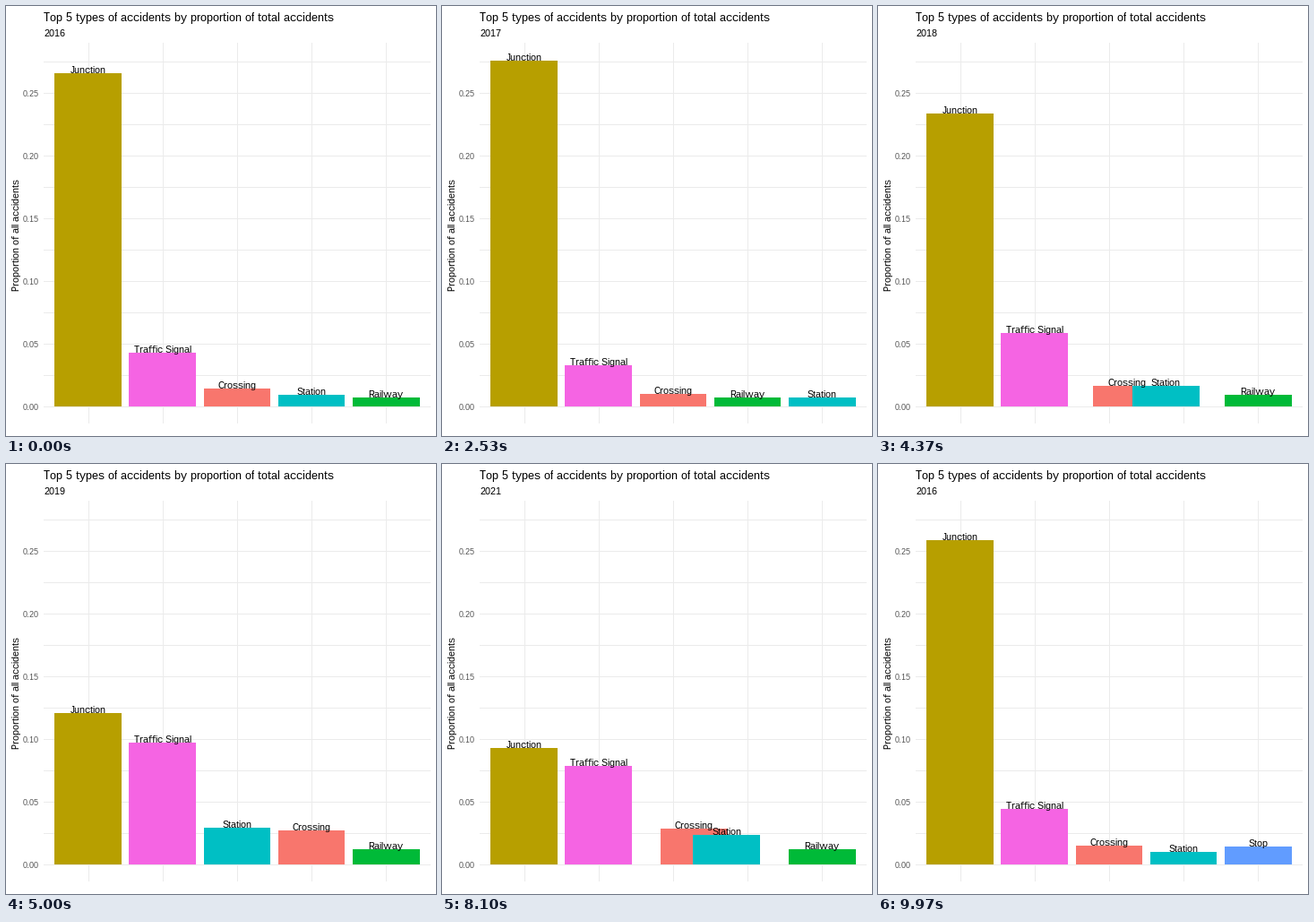
A matplotlib script for the animation above (10 s loop, 480 by 480 pixels).

```python
import matplotlib.pyplot as plt
from matplotlib.animation import FuncAnimation
from matplotlib.patches import Rectangle

plt.rcParams.update({
    "font.family": "Liberation Sans",
    "text.hinting": "native",
    "text.hinting_factor": 1,
    "text.kerning_factor": 6,
})

SIZE, DPI = 480, 72
FRAMES, LOOP_MS = 300, 10000
STEP = 50            # frames per year
HOLD = 25            # frames at rest before the bars move
BASE = 447           # pixel row of zero
FIRST_LEFT, SLOT, BAR_W = 54.35, 83.08, 74.85

COLORS = {
    "Crossing": "#F8766D",
    "Junction": "#B79F00",
    "Railway": "#00BA38",
    "Station": "#00BFC4",
    "Stop": "#619CFF",
    "Traffic Signal": "#F564E3",
}

# Bar tops in pixels, listed in rank order for each year
YEARS = [
    (2016, {"Junction": 75, "Traffic Signal": 387, "Crossing": 427,
            "Station": 434, "Railway": 437}),
    (2017, {"Junction": 60.6, "Traffic Signal": 400.7, "Crossing": 433.2,
            "Railway": 437.1, "Station": 437.3}),
    (2018, {"Junction": 70.1, "Traffic Signal": 382, "Crossing": 428.7,
            "Station": 429.7, "Railway": 435.3}),
    (2019, {"Junction": 278, "Traffic Signal": 311, "Station": 406,
            "Crossing": 409, "Railway": 430}),
    (2020, {"Junction": 288.4, "Traffic Signal": 316.9, "Station": 408.7,
            "Crossing": 410.2, "Railway": 430}),
    (2021, {"Junction": 328.1, "Traffic Signal": 344.3, "Crossing": 406.2,
            "Station": 416.3, "Stop": 427}),
]

fig = plt.figure(figsize=(SIZE / DPI, SIZE / DPI), dpi=DPI, facecolor="white")
ax = fig.add_axes([0, 0, 1, 1])
ax.set(xlim=(0, SIZE), ylim=(SIZE, 0))
ax.axis("off")


def box(x, y, w, h, color, z):
    patch = Rectangle((x, y), w, h, facecolor=color, linewidth=0,
                      antialiased=False, zorder=z)
    return ax.add_patch(patch)


def label(x, y, text, size=11, color="black", **kw):
    return ax.text(x, y, text, fontsize=size, color=color, va="baseline",
                   zorder=4, **kw)


def draw_panel():
    for i in range(12):
        box(42, BASE - 35 * i, 432, 1, "#EBEBEB", 1)
    for i in range(5):
        box(round(91.8 + SLOT * i), 41, 1, 425, "#EBEBEB", 1)
    for i in range(6):
        label(37, BASE + 4 - 70 * i, f"{0.05 * i:.2f}", 9, "#4D4D4D",
              ha="right")
    label(42, 17, "Top 5 types of accidents by proportion of total accidents",
          13)
    label(15, 255, "Proportion of all accidents", ha="center", rotation=90,
          rotation_mode="anchor")


draw_panel()
subtitle = label(42, 34, "")
bars = {name: box(0, 0, 0, 0, color, 2 + 0.1 * i)
        for i, (name, color) in enumerate(COLORS.items())}
names = {name: label(0, 0, name, ha="center") for name in COLORS}


def layout(year_index):
    """Map each name to its (rank, top) in the given year."""
    tops = YEARS[year_index][1]
    return {name: (rank, top) for rank, (name, top) in enumerate(tops.items())}


def update(frame):
    index, local = divmod(frame, STEP)
    following = (index + 1) % len(YEARS)
    t = max(0, local - HOLD) / (STEP - HOLD)
    start, end = layout(index), layout(following)
    subtitle.set_text(str(YEARS[following if t > 0.5 else index][0]))

    for name, bar in bars.items():
        shown = name in start
        bar.set_visible(shown)
        names[name].set_visible(shown)
        if not shown:
            continue
        # A bar that drops out next year rests until the change is over
        goal = end.get(name, start[name])
        rank, top = (a + (b - a) * t for a, b in zip(start[name], goal))
        left = FIRST_LEFT + SLOT * rank
        x0, x1, y = round(left), round(left + BAR_W), round(top)
        bar.set_bounds(x0, y, x1 - x0, BASE - y)
        names[name].set_position((left + BAR_W / 2, y))
    return [subtitle, *bars.values(), *names.values()]


anim = FuncAnimation(fig, update, frames=FRAMES, interval=LOOP_MS / FRAMES,
                     repeat=True, repeat_delay=0)
plt.show()
```
